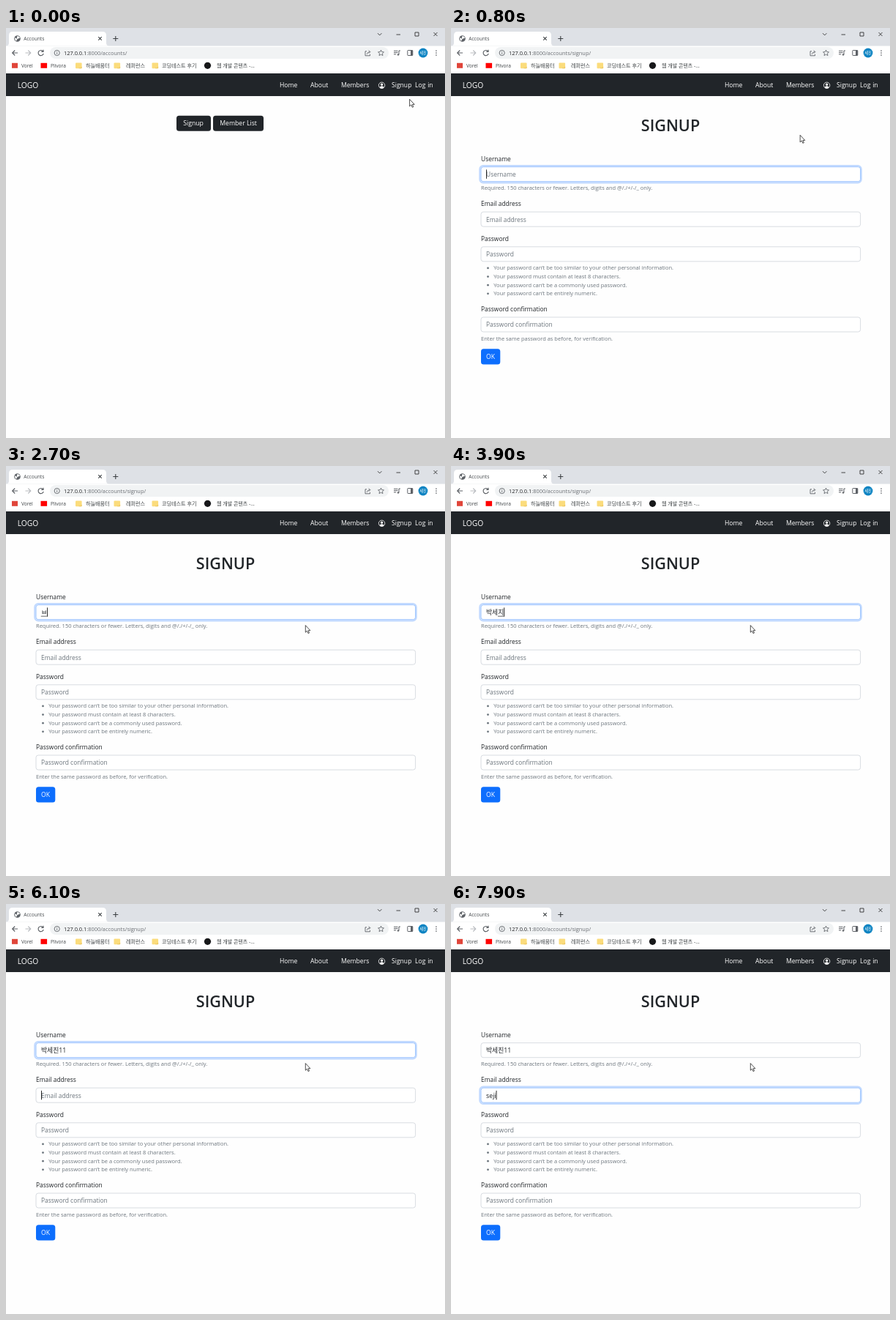
An HTML page for the animation above (8000 ms loop, 600 by 560 pixels).

```html
<!DOCTYPE html>
<html lang="ko">
<head>
<meta charset="utf-8">
<title>Accounts</title>
<style>
html, body { margin: 0; width: 100%; height: 100%; overflow: hidden; background: #fefefe; }
svg { display: block; width: 600px; height: 560px; }
text { font-family: "Open Sans", "Noto Sans CJK KR", "Noto Sans CJK", "Noto Sans CJK SC", sans-serif; white-space: pre; }
</style>
</head>
<body>
<svg id="stage" viewBox="0 0 600 560" xmlns="http://www.w3.org/2000/svg"></svg>
<script>
const LOOP = 8000, STEP = 100;
const INK = '#212529', GRAY = '#6c757d', ICON = '#5f6368';

const text = (x, y, s, size, fill = INK, extra = '') =>
  `<text x="${x}" y="${y}" font-size="${size}" fill="${fill}" ${extra}>${s}</text>`;
const rect = (x, y, w, h, r, fill, extra = '') =>
  `<rect x="${x}" y="${y}" width="${w}" height="${h}" rx="${r}" fill="${fill}" ${extra}/>`;
const line = (d, color = ICON, w = 1, extra = '') =>
  `<path d="${d}" fill="none" stroke="${color}" stroke-width="${w}" ${extra}/>`;
const dot = (x, y, r, fill, extra = '') =>
  `<circle cx="${x}" cy="${y}" r="${r}" fill="${fill}" ${extra}/>`;
const group = (id, body) => `<g id="${id}">${body}</g>`;

function tabStrip() {
  return rect(0, 0, 600, 25, 0, '#dee1e6') +
    '<path d="M0 24.5Q4 24.5 4 20V10Q4 5 9 5H132Q137 5 137 10V20Q137 24.5 141 24.5Z" fill="#fff"/>' +
    group('globe', dot(15.5, 14.5, 4.3, ICON) +
      '<path d="M12 13.2l2.6 1 .4 1.6-1.2 2.2Q12 16.6 12 13.2zM15.4 11l2.6.8 1 2-2 .4-1.6 1.2-.6-1.8z" fill="#fff"/>') +
    group('spinner', line('M15.5 10.7a3.8 3.8 0 1 1-3.8 3.8', '#777c82', 1.2)) +
    text(24.3, 17, 'Accounts', 6.6, '#45494d') +
    line('M126.3 12.2l4.4 4.4m0-4.4l-4.4 4.4', '#3c4043', 1.1) +
    line('M146.3 14.5h7m-3.5-3.5v7', '#3c4043', 1.1) +
    line('M508 7.2l2.7 2.7 2.7-2.7M533.5 9h5.5M559 6h5v5h-5zM584.5 6l5 5m0-5l-5 5', '#333', 0.9);
}

function toolbar() {
  return rect(0, 24.5, 600, 37.5, 0, '#fff') +
    line('M16 34H8.8m3.4-3.5L8.7 34l3.5 3.5', ICON, 1.2) +
    line('M26.5 34h7.2m-3.4-3.5l3.5 3.5-3.5 3.5', '#b9bcc0', 1.1) +
    line('M50.4 31.7a3.6 3.6 0 1 0 .8 3.2M51 29.8v2.6h-2.7', ICON, 1.2) +
    rect(60, 26, 463, 16, 8, '#f1f3f4') +
    dot(69.7, 34, 3.6, 'none', `stroke="${ICON}" stroke-width=".9"`) +
    line('M69.7 33.5v2.3m0-4v.9', ICON, 0.9) +
    '<text x="79" y="36.7" font-size="7.4" fill="#202124">127.0.0.1<tspan id="path" fill="#6a6e73"></tspan></text>' +
    line('M493 31.8h-2v6h6.5v-2M493.3 35.8q.4-3.2 4.2-3.2m-1.7-2l2 2-2 2', ICON, 0.9) +
    line('M512.5 30l1.15 2.6 2.85.3-2.1 1.9.6 2.8-2.5-1.45-2.5 1.45.6-2.8-2.1-1.9 2.85-.3z', ICON, 0.85) +
    line('M530 31.3h5.5m-5.5 2.3h5.5m-5.5 2.3h3.2m3.8 .5v-5.4h2', ICON, 1) +
    dot(536, 36.4, 1.2, ICON) +
    rect(548.8, 30.5, 7, 7, 0.6, 'none', `stroke="${ICON}"`) + rect(553, 30.5, 3, 7, 0, ICON) +
    dot(570, 34, 6.4, '#0b83c2') + text(570, 35.9, '세진', 5.2, '#fff', 'text-anchor="middle"') +
    [31, 34, 37].map(y => dot(588, y, 0.85, ICON)).join('');
}

function bookmarks() {
  const folder = x => rect(x, 47.5, 8.6, 7.8, 1, '#fbdc7c') +
    line(`M${x + 4.6} 54.8h3.6v-2`, '#e3b84a', 0.6);
  const label = (x, s, size = 7.1) => text(x, 53.8, s, size, '#3c4043');
  return rect(8, 47.8, 8, 7, 0, '#e0453a') + label(21, 'Vorel', 6.6) +
    rect(47.5, 47.8, 8.6, 7, 0, '#f00') + label(61, 'Plivora', 6.6) +
    [95, 147.5, 199.5].map(folder).join('') +
    label(109, '하늘배움터') + label(164, '레퍼런스') + label(213, '코딩테스트 후기') +
    dot(275.5, 51.3, 4.6, '#17181a') + label(288, '웹 개발 콘텐츠 -...', 7);
}

function navbar() {
  const links = [[374, 'Home'], [416, 'About'], [458, 'Members'], [527, 'Signup'], [559, 'Log in']];
  return rect(0, 62, 600, 31, 0, INK) + text(15.7, 81.5, 'LOGO', 10.3, '#fff') +
    links.map(([x, s]) => text(x, 80.8, s, 8.6, '#fff', 'word-spacing=".6"')).join('') +
    dot(513.6, 78.3, 4.2, 'none', 'stroke="#fff" stroke-width=".8"') +
    dot(513.6, 77.2, 1.6, '#fff') +
    '<path d="M510.5 81q1-1.8 3.1-1.8t3.1 1.8q-1.3 1.5-3.1 1.5t-3.1-1.5z" fill="#fff"/>';
}

const homePage = () =>
  rect(233, 119.7, 47, 21, 3.5, INK) + text(242.2, 133.4, 'Signup', 8.7, '#fff') +
  rect(283, 119.7, 69, 21, 3.5, INK) + text(292.2, 133.4, 'Member List', 8.7, '#fff');

function field(id, label, y) {
  return text(41, y - 7.7, label, 8.45) +
    rect(39.4, y - 1.1, 521.2, 23.2, 4.6, 'none', `id="${id}Glow" stroke="#0d6efd" stroke-width="2.3"`) +
    rect(41, y + 0.5, 518.6, 20, 3.2, '#fff', `id="${id}Box" stroke="#ced4da" stroke-width=".8"`) +
    text(48, y + 13.9, label, 8.45, GRAY, `id="${id}Hint"`) +
    text(48, y + 13.9, '', 8.8, INK, `id="${id}Value"`);
}

function signupPage() {
  const rules = [
    'Your password can’t be too similar to your other personal information.',
    'Your password must contain at least 8 characters.',
    'Your password can’t be a commonly used password.',
    'Your password can’t be entirely numeric.'
  ];
  const help = (x, y, s) => text(x, y, s, 7.5, GRAY);
  return text(300, 141, 'SIGNUP', 21.6, INK, 'font-weight="600" text-anchor="middle"') +
    field('user', 'Username', 189.2) +
    help(41, 221.2, 'Required. 150 characters or fewer. Letters, digits and @/./+/-/_ only.') +
    field('mail', 'Email address', 250.7) +
    field('pass', 'Password', 298.3) +
    rules.map((s, i) => dot(50.5, 327.9 + i * 11.65, 1.4, GRAY) + help(58.3, 330.3 + i * 11.65, s)).join('') +
    field('again', 'Password confirmation', 394.5) +
    help(41, 426.6, 'Enter the same password as before, for verification.') +
    rect(41, 438.2, 26.3, 21.2, 3.5, '#0d6efd') + text(48, 451.9, 'OK', 8.6, '#fff') +
    '<path id="compose" stroke="#212529" stroke-width=".7"/>' +
    rect(0, 0, 0.9, 12.4, 0, '#111', 'id="caret"');
}

const pointer =
  group('arrow', '<path d="M0 0V9.6L2.2 7.6 3.7 11 5.2 10.4 3.8 7.1H6.6Z" fill="#fff" stroke="#222" stroke-width=".8"/>') +
  group('hand', '<path d="M-.9 .7Q0-.4 .9 .7V4.2L4 5Q4.8 5.3 4.6 6.4L3.8 11H-1L-3.6 7.4Q-3.6 6-2.3 6.5L-.9 7.6Z" fill="#fff" stroke="#222" stroke-width=".6"/>');

const stage = document.getElementById('stage');
stage.innerHTML = rect(0, 0, 600, 560, 0, '#fefefe') + tabStrip() + toolbar() + bookmarks() + navbar() +
  group('home', homePage()) + group('signup', signupPage()) + group('pointer', pointer);

const el = id => document.getElementById(id);
const show = (id, on) => el(id).setAttribute('display', on ? 'inline' : 'none');
const set = (id, attrs) => Object.entries(attrs).forEach(([k, v]) => el(id).setAttribute(k, v));
const smooth = u => { u = Math.min(1, Math.max(0, u)); return u * u * (3 - 2 * u); };
const mix = (a, b, u) => a + (b - a) * u;

const LOADED = 500, TAB_KEY = 6100, COMMIT = 5400;
const typing = {
  user: [[2700, 'ㅂ'], [2900, '바'], [3000, '박'], [3100, '박ㅅ'], [3600, '박세'], [3800, '박세ㅈ'],
    [3900, '박세지'], [4000, '박세진'], [5400, '박세진1'], [5800, '박세진11']],
  mail: [[7300, 's'], [7700, 'se'], [7800, 'sej'], [7900, 'seji']]
};
const blinks = [500, 1000, 1500, 2000, 2600, 4600, 5100, 6700, 7200];

const typed = (id, t) => typing[id].reduce((s, [at, v]) => t >= at ? v : s, '');

function drawFocus(id, amount) {
  const stroke = [[206, 134], [212, 183], [218, 254]].map(([a, b]) => Math.round(mix(a, b, amount)));
  set(id + 'Glow', { 'stroke-opacity': 0.25 * amount });
  set(id + 'Box', { stroke: `rgb(${stroke})` });
}

function drawForm(t) {
  const moved = smooth((t - TAB_KEY) / 125);
  drawFocus('user', smooth((t - LOADED) / 125) * (1 - moved));
  drawFocus('mail', moved);
  drawFocus('pass', 0);
  drawFocus('again', 0);
  for (const id in typing) {
    const s = typed(id, t);
    el(id + 'Value').textContent = s;
    show(id + 'Hint', !s);
  }
  const active = t < TAB_KEY ? 'user' : 'mail';
  const value = el(active + 'Value');
  const end = 48 + (value.textContent ? value.getComputedTextLength() : 0);
  set('caret', { x: end, y: active === 'user' ? 193.4 : 254.9 });
  show('caret', blinks.filter(b => b <= t).length % 2);
  set('compose', { d: `M${end - 8.3} 205.2H${end - 0.3}` });
  show('compose', value.textContent && t < COMMIT);
}

function drawPointer(t) {
  const near = smooth(t / 200), away = smooth((t - 500) / 600);
  const x = mix(mix(551.6, 545, near), 409.3, away);
  const y = mix(mix(97.3, 75, near), 217.6, away);
  const onLink = y < 86;
  set('pointer', { transform: `translate(${x} ${y})` });
  show('hand', onLink);
  show('arrow', !onLink);
}

function draw(time) {
  const t = Math.floor(time % LOOP / STEP) * STEP;
  const loaded = t >= LOADED, loading = t >= 400 && !loaded;
  show('home', !loaded);
  show('signup', loaded);
  show('spinner', loading);
  show('globe', !loading);
  el('path').textContent = ':8000/accounts/' + (loaded ? 'signup/' : '');
  if (loaded) drawForm(t);
  drawPointer(t);
}

function tick() {
  draw(performance.now());
  requestAnimationFrame(tick);
}
tick();
</script>
</body>
</html>
```
